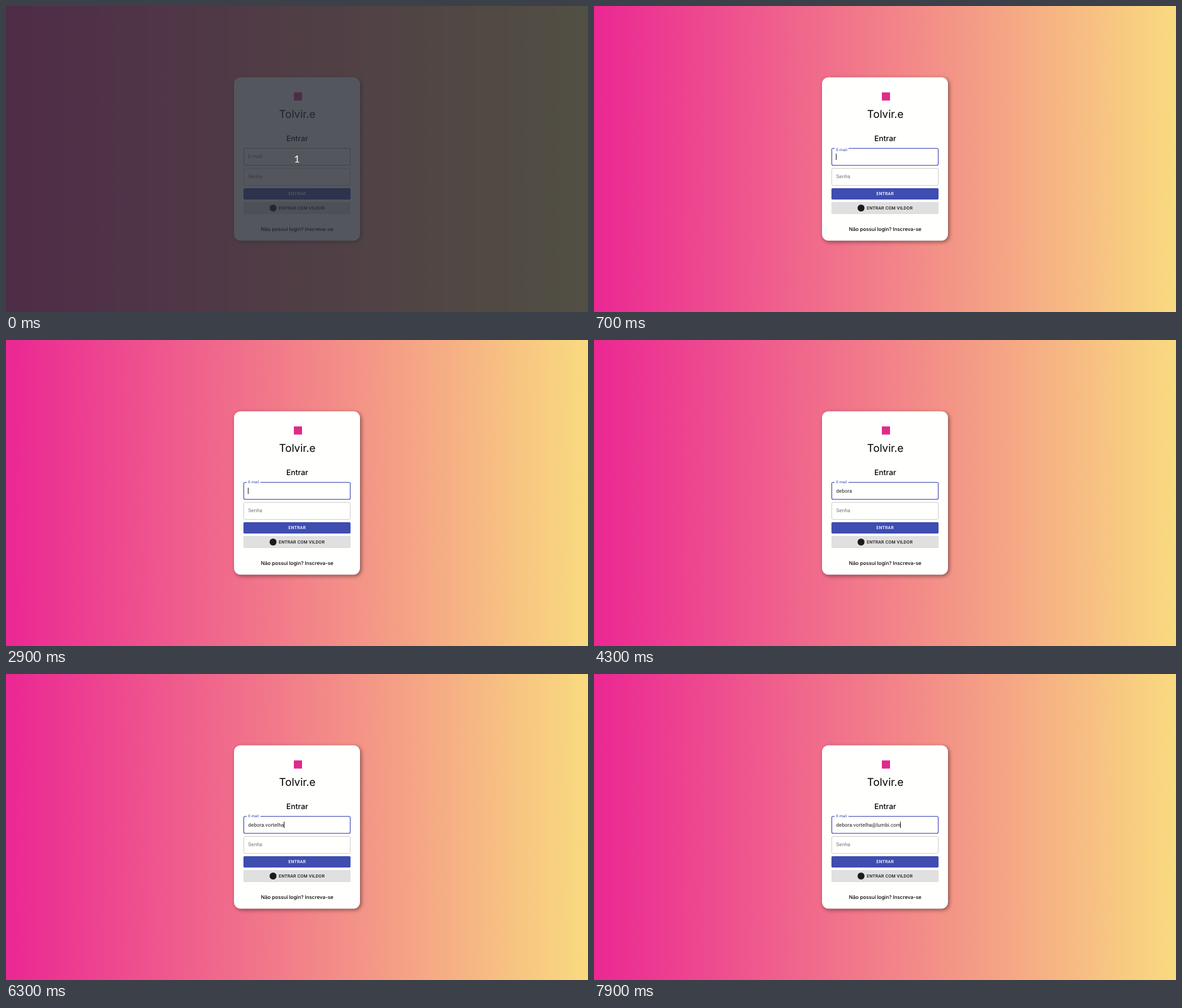
Recreate the animation shown at these times as an HTML page. Size 924x487 px, loop 8 s.

```html
<!DOCTYPE html>
<html lang="pt-BR">
<head>
<meta charset="utf-8">
<title>Login</title>
<style>
  html, body { margin: 0; width: 100%; height: 100%; overflow: hidden; }
  body { background: linear-gradient(90deg, #eb2793, #f9da7f); }
  svg { position: absolute; left: 0; top: 0; display: block; }
  text { font: 8px Roboto, sans-serif; text-rendering: geometricPrecision; }
  .card { fill: #fffffe; filter: drop-shadow(2px 2px 3px rgba(0, 0, 0, .45)); }
  .button { filter: drop-shadow(0 .7px .7px rgba(0, 0, 0, .35)); }
  .head { font-family: Inter, sans-serif; text-anchor: middle; fill: #000; }
  .field { letter-spacing: .075px; }
  .caps { font-size: 7px; font-weight: 500; letter-spacing: .2px; }
  .outline { fill: none; stroke-width: .5; }
  #shade { position: absolute; inset: 0; background: rgba(41, 45, 53, .8); }
  #count {
    position: absolute; left: 446px; top: 233px; width: 32px;
    font: 16px/20px Lato, sans-serif; text-align: center; color: #fff;
  }
</style>
</head>
<body>
<svg width="924" height="487" viewBox="0 0 924 487">
  <rect class="card" x="362" y="113.5" width="200" height="260" rx="10"/>
  <rect x="457" y="137.5" width="13" height="13" fill="#df2b8c"/>
  <text class="head" x="462.5" y="178" style="font-size:17px">Tolvir.e</text>
  <text class="head" x="462.3" y="215.2" style="font-size:12px;font-weight:500">Entrar</text>

  <rect id="border" class="outline" x="377.5" y="226.5" width="169" height="27" rx="2"/>
  <rect id="notch" x="382" y="225" width="22" height="3" fill="#fffffe"/>
  <text id="label" class="field">E-mail</text>
  <text id="typed" class="field" x="384.5" y="242.8" fill="#212121"></text>
  <rect id="caret" y="235" width="1" height="10" fill="#212121"/>

  <rect class="outline" x="377.5" y="258.5" width="169" height="27" rx="2" stroke="#a0a0a0"/>
  <text class="field" x="384.5" y="274.4" fill="#757575">Senha</text>

  <rect class="button" x="377" y="290" width="170" height="18" rx="2" fill="#3f4db0"/>
  <text class="caps" x="448.3" y="301.3" fill="#fff">ENTRAR</text>
  <rect class="button" x="377" y="312" width="170" height="18.5" rx="2" fill="#e0e0e0"/>
  <circle cx="424" cy="321.5" r="5.5" fill="#1b1b1b"/>
  <text class="caps" x="433" y="323.8" fill="#1c1c1c">ENTRAR COM VILDOR</text>
  <text class="head" x="462.2" y="357.5" style="font-weight:500">Não possui login? Inscreva-se</text>
</svg>
<div id="shade"><div id="count">1</div></div>

<script>
  const LOOP = 8000, FRAME = 100, BLINK = 600, CLICK = 500;
  const EMAIL = 'debora.vortelha@lumbi.com';
  // Typing rhythm: [characters, ms], even pace between points.
  const PACE = [[0, 2900], [3, 3100], [6, 3700], [7, 4700], [9, 5500],
    [11, 5900], [15, 6300], [16, 6600], [25, 7900]];

  function keyTime(n) {
    const i = PACE.findIndex(([count]) => count >= n);
    const [n0, t0] = PACE[i - 1], [n1, t1] = PACE[i];
    return Math.round(t0 + (t1 - t0) * (n - n0) / (n1 - n0));
  }
  const keys = [...EMAIL].map((_, i) => keyTime(i + 1));

  const [shade, border, notch, label, typed, caret] =
    ['shade', 'border', 'notch', 'label', 'typed', 'caret']
      .map(id => document.getElementById(id));
  const easeOut = p => 1 - (1 - p) ** 2;
  const clamp = p => Math.min(1, Math.max(0, p));
  const show = (el, on) => el.style.visibility = on ? 'visible' : 'hidden';
  const set = (el, attrs) => {
    for (const name in attrs) el.setAttribute(name, attrs[name]);
  };

  function draw(t) {
    const focus = easeOut(clamp((t - CLICK - 60) / 240));
    const active = focus > 0;
    show(shade, t < FRAME);
    show(notch, active);
    border.style.strokeWidth = active ? 1.1 : .5;
    set(border, { stroke: active ? '#3f4db0' : '#404040' });
    set(label, {
      fill: active ? '#3f4db0' : '#757575',
      transform: `translate(384.5 ${242.4 - 14.4 * focus}) scale(${1 - .25 * focus})`
    });

    const pressed = keys.filter(key => key <= t);
    const text = EMAIL.slice(0, pressed.length);
    if (typed.textContent !== text) typed.textContent = text;
    const width = text ? typed.getComputedTextLength() : 0;
    set(caret, { x: Math.floor(384.5 + width) });
    // Each key press restarts the blink.
    const idle = t - (pressed.at(-1) ?? CLICK);
    show(caret, active && Math.floor(idle / BLINK) % 2 === 0);
  }

  const start = performance.now();
  function tick() {
    const t = (performance.now() - start) % LOOP;
    draw(Math.floor(t / FRAME) * FRAME);
    requestAnimationFrame(tick);
  }
  tick();
</script>
</body>
</html>
```
